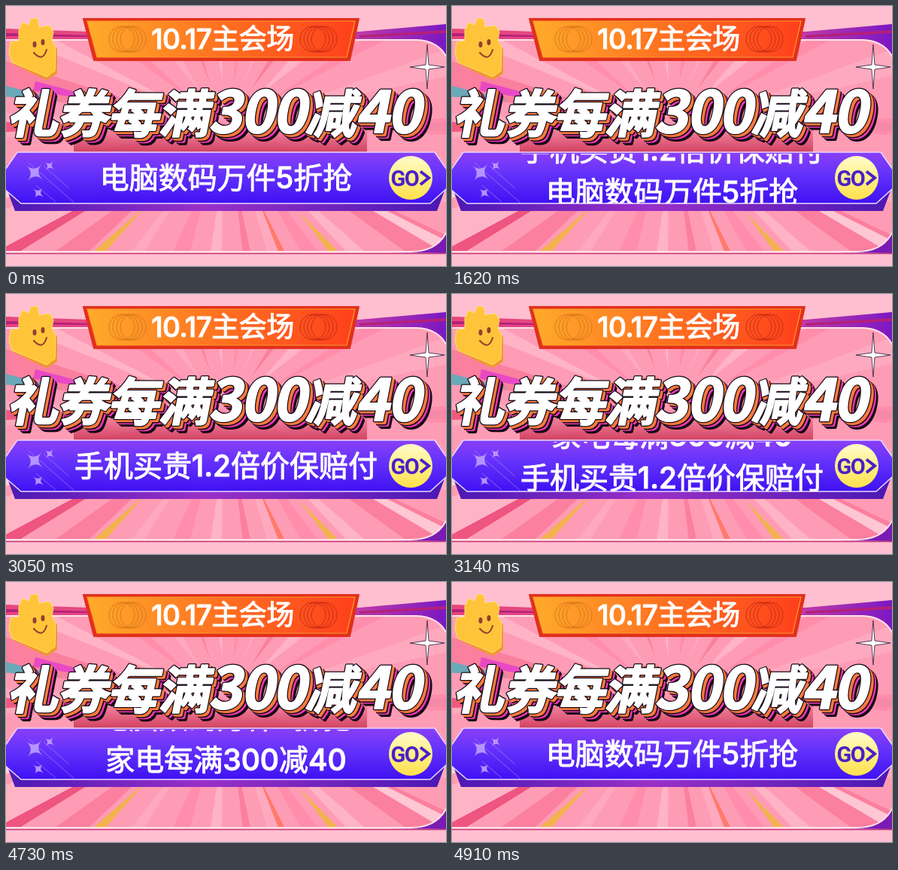
An HTML page that plays this animation: 585x345 px, repeating every 4.94 s.

```html
<!DOCTYPE html>
<html lang="zh-CN">
<head>
<meta charset="utf-8">
<title>主会场</title>
<style>
html, body { margin: 0; width: 100%; height: 100%; overflow: hidden; background: #ffbfd0 }
svg { display: block; width: 585px; height: 345px }
text { font-family: Inter, "Noto Sans CJK SC", "Noto Sans CJK", sans-serif; font-weight: 500; text-anchor: middle; fill: #fff }
.bold { stroke: #fff; stroke-width: 1 }
.head { font: 900 68px "Noto Sans CJK SC", "Noto Sans CJK", sans-serif; letter-spacing: -1px; text-anchor: start; stroke-linejoin: round }
.head tspan { font-size: 76px; letter-spacing: -2px }
.go { font-family: Roboto, sans-serif; font-weight: 700; fill: #4a20c8 }
</style>
</head>
<body>
<svg viewBox="0 0 585 345">
  <defs>
    <linearGradient id="bar" x2="0" y2="1">
      <stop stop-color="#8a40f8"/><stop offset=".45" stop-color="#6230fb"/><stop offset="1" stop-color="#3f11f2"/>
    </linearGradient>
    <linearGradient id="lip">
      <stop stop-color="#4a18b4"/><stop offset=".45" stop-color="#9a30c8"/><stop offset="1" stop-color="#4a18b4"/>
    </linearGradient>
    <linearGradient id="plate">
      <stop stop-color="#ffab2a"/><stop offset=".5" stop-color="#ff7020"/><stop offset="1" stop-color="#ff401c"/>
    </linearGradient>
    <linearGradient id="band">
      <stop stop-color="#e8457c"/><stop offset=".7" stop-color="#e04a9a"/><stop offset="1" stop-color="#7a18c4"/>
    </linearGradient>
    <linearGradient id="shade" x2="0" y2="1">
      <stop stop-color="#d9486c" stop-opacity="0"/><stop offset="1" stop-color="#d0405f"/>
    </linearGradient>
    <linearGradient id="gold" x2="0" y2="1">
      <stop stop-color="#fffbc8"/><stop offset=".5" stop-color="#fff08a"/><stop offset="1" stop-color="#ffe04a"/>
    </linearGradient>
    <clipPath id="stage"><use href="#panel"/></clipPath>
    <clipPath id="slot"><path d="M0 196H585V262H0Z"/></clipPath>
  </defs>

  <!-- backdrop -->
  <path fill="#ffbfd0" d="M0 0H585V345H0Z"/>
  <path fill="url(#band)" d="M0 30L110 34H470L585 24V80H0Z"/>
  <path fill="#b3207a" d="M0 36L110 39V41L0 40ZM470 39L585 32V36L470 42Z"/>
  <path fill="#7a1cb4" d="M500 327L585 280V328Z"/>
  <path id="panel" fill="#ff9cb5" d="M-10 45H546Q580 46 590 78V288Q580 326 538 326H-10Z"/>
  <g clip-path="url(#stage)">
    <g id="rays"></g>
    <path fill="url(#shade)" d="M90 150H480V195H90Z"/>
  </g>
  <path fill="none" stroke="#ffe3ea" stroke-width="2" d="M-10 45H546Q580 46 590 78V288Q580 326 538 326H-10"/>
  <path fill="none" stroke="#c83a78" stroke-width="1.5" d="M0 328.500H585"/>

  <!-- title plate -->
  <path fill="#e2301c" stroke="#e2301c" stroke-width="2" stroke-linejoin="round" d="M103 17H469L457 72H117Z"/>
  <path fill="url(#plate)" stroke="#ff9a2a" stroke-width="1.2" d="M108 20H464L453 68H121Z"/>
  <g id="rings" fill="none"></g>
  <text class="bold" x="288" y="57" font-size="37" letter-spacing="-.5">10.17主会场</text>

  <!-- mascot -->
  <path fill="#f0982a" d="M8 76L38 91L54 98L68 90V56L60 50Z"/>
  <path fill="#ffc43a" stroke="#ffdf6c" stroke-linejoin="round" d="M17 32L22 22L30 25L34 16L42 17L44 28L58 26L63 34L61 45L66 55L65 86L54 94L38 87L8 75L4 62L6 48L17 46Z"/>
  <g fill="#8f4030"><ellipse cx="38" cy="51" rx="2.500" ry="4"/><ellipse cx="49" cy="48" rx="2.500" ry="4"/></g>
  <path fill="none" stroke="#8f4030" stroke-width="2" stroke-linecap="round" d="M37 62Q49 75 54 58"/>

  <!-- sparkle -->
  <path fill="#fff" stroke="#2b1730" stroke-width=".8" d="M560 51L562 78L583 81L562 84L560 110L558 84L537 81L558 78Z"/>

  <!-- headline -->
  <g id="headline" transform="translate(1 168) skewX(-11)"></g>

  <!-- banner -->
  <path fill="url(#lip)" d="M0 240L12 272H573L585 240Z"/>
  <path fill="url(#bar)" stroke="#e6d8ff" stroke-width="1.500" d="M15 194H570L586 217V242L564 262H20L-1 244V217Z"/>
  <g stroke="#a583ff" opacity=".7"><path d="M30 208L92 262M50 212L84 242M40 238L66 260"/></g>
  <g id="stars" fill="#c3a6ff" opacity=".85"></g>
  <g id="lines" clip-path="url(#slot)" font-size="39"></g>

  <!-- button -->
  <circle cx="538" cy="228" r="29" fill="url(#gold)"/>
  <text class="go" x="530" y="238.500" font-size="29" letter-spacing="-1.500">GO</text>
  <path fill="none" stroke="#4a20c8" stroke-width="4" d="M551 219.500L562 228L551 237"/>
</svg>

<script>
const $ = id => document.getElementById(id);
const range = n => [...Array(n).keys()];

// Broad, soft rays plus a few bright streaks
const tints = ['#ff8dab', '#ffa9bf', '#fb7f9f', '#ffb4c6'];
const spoke = (a, w, r0, r1, fill) => {
  const at = (r, b) => `${292 + r * Math.cos(b)} ${160 + r * Math.sin(b)}`;
  return `<path fill="${fill}" d="M${at(r0, a)}L${at(r1, a - w)}L${at(r1, a + w)}Z"/>`;
};
const streaks = [
  [3.35, '#e84ac4', 130, 260], [3.3, '#6aa9b8', 220, 300], [3.14, '#ef5a80', 90, 420], [0, '#f58aa8', 90, 420],
  [2.36, '#f2b24e', 150, 240], [.86, '#f2b24e', 150, 230], [1.15, '#ff7a6c', 100, 210],
  [2.62, '#ee5580', 90, 420], [2.85, '#ffd3de', 90, 420], [.5, '#ffc6d4', 90, 420]
];
$('rays').innerHTML =
  range(26).map(i => spoke(i * .2417 + .05 * Math.sin(i * 7), .04 + .02 * (i % 3), 60, 420, tints[i % 4])).join('') +
  streaks.map(([a, c, r0, r1]) => spoke(a, .025, r0, r1, c)).join('');

const ringSet = (x, color) => range(4).map(i =>
  `<circle cx="${x + i * 5}" cy="44" r="17" stroke="${color}"/>`).join('');
$('rings').innerHTML = ringSet(154, '#d9781a') + ringSet(408, '#c92c14');

// Headline: stacked offset outlines under the white face
const face = '礼券每满<tspan>300</tspan>减<tspan>40</tspan>';
const ink = '#160a18', pink = '#f03ab0', orange = '#ff7a3c';
$('headline').innerHTML = [[11, ink, 4], [9, ink, 5], [8, pink, 4], [6, pink, 4], [5, ink, 5], [4, orange, 4], [2, orange, 4], [0, ink, 4.5], [0, '#fff', 2]]
  .map(([d, c, w]) => `<text class="head" x="${d}" y="${d * .8}" stroke="${c}" stroke-width="${w}" style="fill:${c}">${face}</text>`).join('');

const star = (x, y, r) =>
  `<path d="M${x} ${y - r}Q${x} ${y} ${x + r} ${y}Q${x} ${y} ${x} ${y + r}Q${x} ${y} ${x - r} ${y}Q${x} ${y} ${x} ${y - r}Z" transform="rotate(40 ${x} ${y})"/>`;
$('stars').innerHTML = star(38, 221, 15) + star(58, 212, 8) + star(43, 248, 9);

const offers = ['电脑数码万件5折抢', '手机买贵1.2倍价保赔付', '家电每满300减40'];
$('lines').innerHTML = offers.map(s => `<text class="bold" x="292.5" y="242">${s}</text>`).join('');
const lines = [...$('lines').children];

// start, end, number of steps
const swaps = [[1530, 1780, 6], [3050, 3300, 7], [4700, 4910, 7]];
const gap = 56;

function draw(now) {
  const t = now % 4940;
  const shift = swaps.reduce((sum, [a, b, n]) =>
    sum + Math.floor(Math.min(1, Math.max(0, (t - a) / (b - a))) * n + 1e-6) / n, 0);
  // Each offer drops out downwards while the next one follows from above
  lines.forEach((line, i) => {
    const d = ((shift - i + 4.5) % 3) - 1.5;
    line.setAttribute('transform', `translate(0 ${d * gap})`);
  });
}

const start = performance.now();
function tick() {
  draw(performance.now() - start);
  requestAnimationFrame(tick);
}
tick();
</script>
</body>
</html>
```
